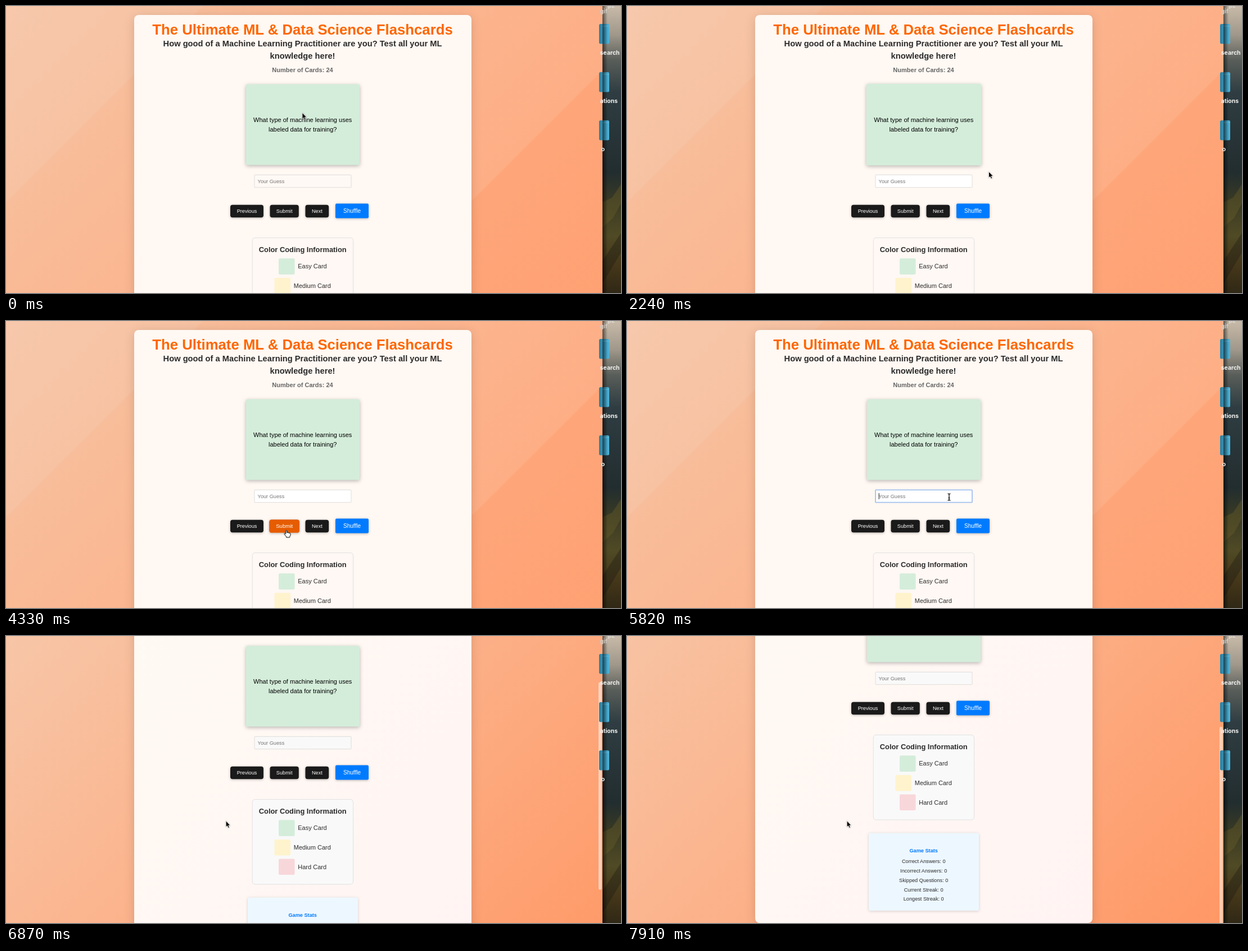
Write an HTML page that moves like this. It is 1094 by 512 pixels and loops after 8 s.

```html
<!DOCTYPE html>
<html lang="en">
<head>
<meta charset="utf-8">
<title>Flashcards</title>
<style>
  html, body { margin: 0; width: 100%; height: 100%; overflow: hidden; }
  svg { display: block; width: 100%; height: 100%; }
  text { font-family: "Liberation Sans", Arial, sans-serif; font-size: 11.04px; }
  .mid { text-anchor: middle; }
  .bold { font-weight: bold; }
  .small { font-size: 9.2px; }
  .dark { fill: #2b2b2b; }
  .scaling { transform-box: fill-box; transform-origin: center; }
  #sheet { filter: drop-shadow(0 3px 9px rgba(0, 0, 0, .14)); }
  #card rect { filter: drop-shadow(0 2.8px 3.5px rgba(0, 0, 0, .27)); }
  .button rect { filter: drop-shadow(0 1.8px 2px rgba(0, 0, 0, .28)); }
  .button text { fill: #fff; }
  #stats rect { filter: drop-shadow(0 1px 2.5px rgba(0, 0, 0, .16)); }
  #cursor { filter: drop-shadow(0 .8px .8px rgba(0, 0, 0, .3)); }
  .label { font: bold 10.4px "Inter", "Liberation Sans", sans-serif; fill: #f2f2f0; text-anchor: end; }
</style>
</head>
<body>
<svg viewBox="0 0 1094 512" preserveAspectRatio="none">
  <defs>
    <linearGradient id="smooth" gradientUnits="userSpaceOnUse" x2="917" y2="917">
      <stop stop-color="#f6c9ac"/><stop offset=".5" stop-color="#fcb189"/><stop offset="1" stop-color="#ff9764"/>
    </linearGradient>
    <linearGradient id="banded" gradientUnits="userSpaceOnUse" x2="917" y2="917">
      <stop stop-color="#f7c8ac"/><stop offset=".19" stop-color="#f7c2a2"/>
      <stop offset=".192" stop-color="#f8bd9a"/><stop offset=".64" stop-color="#feae85"/>
      <stop offset=".642" stop-color="#fea67a"/><stop offset="1" stop-color="#ff9e6f"/>
    </linearGradient>
    <linearGradient id="paper" x2="1" y2="1">
      <stop stop-color="#fffaf3"/><stop offset="1" stop-color="#fff4f3"/>
    </linearGradient>
    <linearGradient id="wallpaper" x2="0" y2="1">
      <stop stop-color="#c8baa8"/><stop offset=".1" stop-color="#a0988b"/><stop offset=".19" stop-color="#585d59"/>
      <stop offset=".3" stop-color="#2f3d42"/><stop offset=".58" stop-color="#222d2f"/>
      <stop offset=".68" stop-color="#393a24"/><stop offset=".8" stop-color="#504a25"/>
      <stop offset=".9" stop-color="#453719"/><stop offset="1" stop-color="#302816"/>
    </linearGradient>
    <linearGradient id="windowShade">
      <stop stop-opacity=".55"/><stop offset="1" stop-opacity="0"/>
    </linearGradient>
    <linearGradient id="folder">
      <stop stop-color="#2c7f9f"/><stop offset="1" stop-color="#4db3d9"/>
    </linearGradient>
  </defs>

  <g id="page">
    <rect id="backdrop" width="1061" height="773"/>
    <rect id="sheet" x="228" y="16" width="600" height="733" rx="8"/>
    <g class="mid bold dark">
      <text x="527.5" y="50.6" style="font-size:25.74px" fill="#ff6600">The Ultimate ML &amp; Data Science Flashcards</text>
      <text x="527.5" y="72.2" style="font-size:14.69px">How good of a Machine Learning Practitioner are you? Test all your ML</text>
      <text x="527.5" y="94.4" style="font-size:14.69px">knowledge here!</text>
      <text x="527.5" y="118" fill="#666">Number of Cards: 24</text>
    </g>
    <g id="card" class="mid scaling">
      <rect x="427" y="139.5" width="202" height="144" rx="2.5" fill="#d4edda"/>
      <text x="527.7" y="207.4">What type of machine learning uses</text>
      <text x="527.7" y="224">labeled data for training?</text>
    </g>
    <rect id="input" x="442" y="301.3" width="172" height="22.4" rx="1"/>
    <text class="small" x="447.6" y="315.7" fill="#757575">Your Guess</text>
    <path id="caret" d="M448.2 307v11" stroke="#222"/>
    <g id="buttons" class="mid"></g>
    <rect id="legend" x="438.2" y="413.5" width="179.4" height="151.5" rx="5" stroke="#e1e1e1"/>
    <text class="mid bold dark" x="527.7" y="439" style="font-size:12.88px">Color Coding Information</text>
    <g id="levels" class="dark"></g>
    <g id="stats" class="mid small dark">
      <rect x="430" y="588.5" width="196" height="138.5" rx="3" fill="#edf7ff"/>
      <text class="bold small" x="527.7" y="622.7" fill="#007bff">Game Stats</text>
    </g>
  </g>
  <rect id="scrollbar" x="1054" width="5.6" height="370" rx="2.8" fill="#fff" fill-opacity=".5"/>

  <rect x="1061" width="33" height="512" fill="url(#wallpaper)"/>
  <path d="M1094 318 1078 342 1061 350V395L1080 378 1094 352Z" fill="#6a5c2a" opacity=".4"/>
  <path d="M1061 455 1094 405V440L1061 495Z" fill="#1e1d14" opacity=".4"/>
  <g id="folders"></g>
  <rect x="1061" width="9" height="512" fill="url(#windowShade)"/>
  <g class="label">
    <text class="label" x="1083" y="3" style="fill:#dedad4">pz</text>
    <text class="label" x="1070" y="13" style="fill:#d0cbc4">gif</text>
    <text class="label" x="1091.5" y="87">search</text>
    <text class="label" x="1088" y="173">ations</text>
    <text class="label" x="1065" y="259">o</text>
  </g>

  <g id="cursor" stroke-linejoin="round">
    <path data-kind="arrow" d="M.5.4V11.5L3 9.3 4.8 13.2 6.7 12.3 5 8.6H8.3Z" stroke="#fff" stroke-width=".8"/>
    <path data-kind="hand" d="M-1 1Q0-.5 1 1V4.2Q2.4 3.3 3.2 4.7 4.5 3.9 5.2 5.2 7 4.6 7.2 6.4V8.5Q7.1 10 6 11V12.6H0V11.2Q-1.8 9.2-3.6 6.8-3.8 5.5-2.5 5.5L-1 6.8Z" fill="#fff" stroke="#000" stroke-width=".9"/>
    <path data-kind="beam" d="M-2.5-6Q0-6 0-4.5 0-6 2.5-6M0-4.5V4.5M-2.5 6Q0 6 0 4.5 0 6 2.5 6M-1.3 1.6H1.3" fill="none" stroke="#111" stroke-width="1.2"/>
  </g>
</svg>
<script>
  const DURATION = 8000;
  const STEP = 149.2;
  const FIRST_SCROLL = 44;

  // Each key is [step, value...], linear in between.
  const cursorKeys = [
    [0, 526.5, 190], [1, 560, 194], [2, 635, 202], [4, 727, 202], [5, 727, 202],
    [7, 645, 208], [8, 600, 212], [10, 565, 220], [13, 610, 265], [14, 634, 285],
    [15, 643, 295], [16, 638, 290], [17, 618, 268], [20, 570, 235], [22, 535, 262],
    [24, 470, 330], [26, 425, 364], [28, 440, 364], [29, 498.7, 373.3], [31, 500, 372],
    [32, 550, 367], [34, 612, 366], [35, 616, 366], [36, 612, 356], [37, 592, 330],
    [38, 573, 314], [39, 573, 314], [40, 550, 316], [42, 400, 326], [43, 390.7, 329.3]
  ];
  const zoomKeys = [
    [7, 1], [8, 1.025], [9, 1.05], [13, 1.05], [14, 1.035], [15, 1.01], [16, 1],
    [17, 1.025], [18, 1.05], [22, 1.05], [23, 1.03], [24, 1]
  ];
  const scrollKeys = [
    [43, 0], [44, 24.5], [46, 122], [47, 158], [48, 181], [49, 190], [50, 190], [51, 206], [53, 237]
  ];

  const buttons = [
    { label: "Previous", x: 399, w: 59 },
    { label: "Submit", x: 469.5, w: 51.3 },
    { label: "Next", x: 532.5, w: 41.7 },
    { label: "Shuffle", x: 586, w: 59, blue: true }
  ];
  const levels = [["Easy", 485, "#d4edda"], ["Medium", 477.5, "#fff3cd"], ["Hard", 485, "#f8d7da"]];
  const counters = ["Correct Answers", "Incorrect Answers", "Skipped Questions", "Current Streak", "Longest Streak"];

  const $ = id => document.getElementById(id);
  const add = (id, markup) => $(id).insertAdjacentHTML("beforeend", markup);

  for (const b of buttons) {
    b.y = b.blue ? 352.5 : 354.7;
    b.h = b.blue ? 26 : 22.6;
    add("buttons", `<g class="button scaling">
      <rect x="${b.x}" y="${b.y}" width="${b.w}" height="${b.h}" rx="${b.blue ? 2.2 : 4}"/>
      <text x="${b.x + b.w / 2}" y="369" style="font-size:${b.blue ? 10 : 9.2}px">${b.label}</text></g>`);
    b.node = $("buttons").lastElementChild;
  }
  levels.forEach(([name, x, color], i) => {
    const y = 450.3 + i * 34.6;
    add("levels", `<rect x="${x}" y="${y}" width="28.6" height="28.6" rx="2.5" fill="${color}"/>
      <text x="${x + 34.2}" y="${y + 18.1}">${name} Card</text>`);
  });
  counters.forEach((name, i) =>
    add("stats", `<text class="small" x="527.7" y="${642.4 + i * 16.7}">${name}: 0</text>`));
  for (const y of [32, 118, 204]) {
    add("folders", `<rect x="1055" y="${y}" width="18" height="35.5" rx="2.5" fill="url(#folder)"/>
      <path d="M1061 ${y + 4}H1072.5" stroke="#73c8e6" stroke-width=".8"/>`);
  }

  function sample(keys, step) {
    const next = keys.findIndex(k => k[0] > step);
    if (next === 0) return keys[0].slice(1);
    if (next < 0) return keys[keys.length - 1].slice(1);
    const a = keys[next - 1], b = keys[next];
    const p = (step - a[0]) / (b[0] - a[0]);
    return a.slice(1).map((v, i) => v + (b[i + 1] - v) * p);
  }

  const inside = (x, y, b) => x >= b.x && x <= b.x + b.w && y >= b.y && y <= b.y + b.h;
  const inputBox = { x: 442, y: 301, w: 172, h: 23 };

  function paintInput(step, scrolled) {
    const focused = step >= 38 && step < 43;
    $("input").setAttribute("fill", scrolled ? "#f9f9f9" : step >= 15 ? "#fff" : "#fff9f5");
    $("input").setAttribute("stroke", focused ? "#a3c2ee" : "#dfdddb");
    $("input").setAttribute("stroke-width", focused ? 1.8 : 1);
    $("caret").style.display = focused ? "" : "none";
  }

  function render(time) {
    const step = Math.floor((time % DURATION) / STEP);
    const [x, y] = sample(cursorKeys, step);
    const [zoom] = sample(zoomKeys, step);
    const [scroll] = sample(scrollKeys, step);
    const scrolled = step >= FIRST_SCROLL;

    $("page").setAttribute("transform", `translate(0 ${-scroll})`);
    $("backdrop").setAttribute("fill", scrolled ? "url(#smooth)" : "url(#banded)");
    $("sheet").setAttribute("fill", scrolled ? "url(#paper)" : "#fff8f3");
    $("legend").setAttribute("fill", scrolled ? "#f9f9f9" : "#fff8f4");
    $("scrollbar").setAttribute("y", scroll * .691 - 1.7);
    $("scrollbar").style.display = scrolled ? "" : "none";
    $("card").style.transform = `scale(${zoom})`;
    paintInput(step, scrolled);

    let kind = zoom > 1.02 ? "hand" : "arrow";
    if (inside(x, y + scroll, inputBox)) kind = "beam";
    for (const b of buttons) {
      const hover = inside(x, y + scroll, b);
      if (hover) kind = "hand";
      b.node.style.transform = `scale(${hover ? 1.05 : 1})`;
      b.node.firstElementChild.style.fill = b.blue ? (hover ? "#0056b3" : "#007bff") : hover ? "#e65c00" : "#1a1a1a";
    }
    $("cursor").setAttribute("transform", `translate(${x} ${y})`);
    for (const shape of $("cursor").children) {
      shape.style.display = shape.dataset.kind === kind ? "" : "none";
    }
  }

  const start = performance.now();
  function tick() {
    render(performance.now() - start);
    requestAnimationFrame(tick);
  }
  tick();
</script>
</body>
</html>
```
